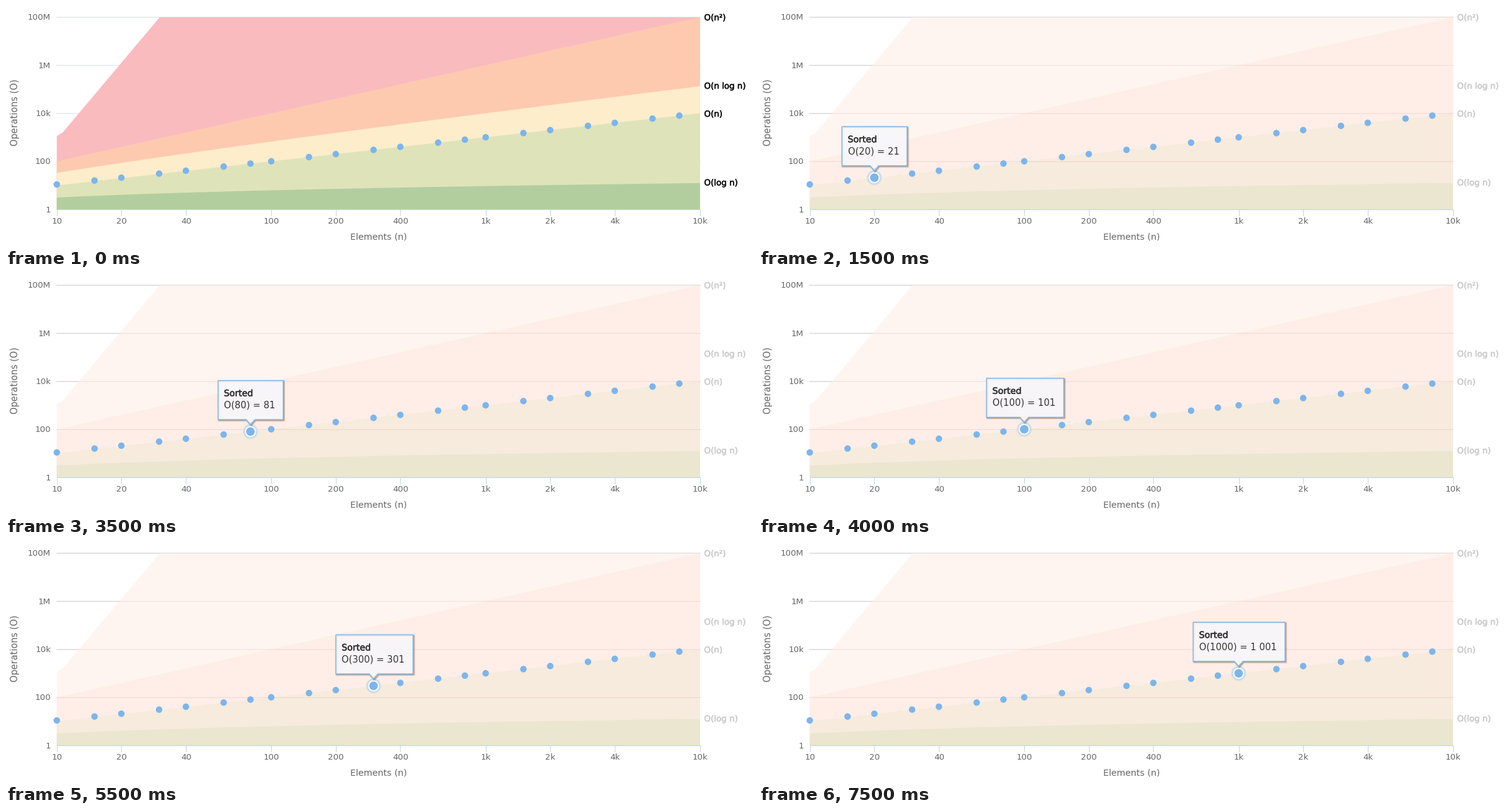
These frames come from a looping animation (1200 px wide and 386 px high, 8 s). A matplotlib script:

```python
import numpy as np
import matplotlib.pyplot as plt
from matplotlib.animation import FuncAnimation
from matplotlib.patches import Circle, Polygon
from matplotlib.patheffects import withStroke

W, H, DPI = 1200, 386, 100
PX = 72 / DPI
LEFT, RIGHT, BASE, DECADE = 81.6, 1115, 327.3, 38.7
BLUE, AXIS = "#7cb5ec", "#c3d3e6"

plt.rcParams["font.family"] = "DejaVu Sans"
fig = plt.figure(figsize=(W / DPI, H / DPI), dpi=DPI, facecolor="white")
ax = fig.add_axes([0, 0, 1, 1])
ax.set(xlim=(0, W), ylim=(H, 0))
ax.axis("off")


def x_of(n):
    return LEFT + (np.log10(n) - 1) * (RIGHT - LEFT) / 3


def y_of(ops):
    return BASE - DECADE * np.log10(ops)


def embolden(t, color):
    t.set_color(color)
    t.set_path_effects([withStroke(linewidth=0.6 * PX, foreground=color)])


def text(x, y, s, size, color="#666666", bold=False, va="baseline", **kw):
    t = ax.text(x, y, s, fontsize=size * PX, color=color, va=va, **kw)
    if bold:
        embolden(t, color)
    return t


# Complexity regions, each painted down to the axis over the one before
n = np.logspace(1, 4, 200)
curves = [
    ([LEFT, 91, 247, RIGHT], [209, 203.5, 18, 18]),
    (x_of(n), y_of(n ** 2)),
    (x_of(n), y_of(n * np.log2(n))),
    (x_of(n), y_of(n)),
    (x_of(n), y_of(np.log2(n)) + 1),
]
VIVID = ["#fabbbf", "#fdcab0", "#feedca", "#dfe3b9", "#b3ce9e"]
FADED = ["#fef5f1", "#feeee7", "#feeee7", "#f6ebdc", "#ebe6d0"]
regions = [ax.fill_between(x, y, BASE, lw=0, zorder=2) for x, y in curves]

# Axes: the grid lies behind the regions and shines through when they fade
shine = []
for power, label in zip((0, 2, 4, 6, 8), ("1", "100", "10k", "1M", "100M")):
    y = y_of(10.0 ** power)
    text(72, y + 4.5, label, 13.4, ha="right")
    if power:
        span = [LEFT, RIGHT], [y + 0.4] * 2
        ax.plot(*span, lw=1.2 * PX, color="#dbe2e7", zorder=1, snap=False)
        shine += ax.plot(*span, lw=1.2 * PX, color=(0.75, 0.55, 0.55, 0.2),
                         zorder=3, snap=False)

ax.plot([LEFT, RIGHT], [327, 327], color=AXIS, lw=1.2 * PX, zorder=3)
for value in (10, 20, 40, 100, 200, 400, 1000, 2000, 4000, 10000):
    x = x_of(value)
    ax.plot([x, x], [327, 337], color=AXIS, lw=PX, zorder=3)
    label = f"{value // 1000}k" if value >= 1000 else str(value)
    text(x + 0.4, 350.5, label, 13.4, ha="center")

text(598.5, 375.5, "Elements (n)", 14.3, ha="center")
text(22.5, 171.5, "Operations (O)", 14.5, ha="right", va="center", rotation=90)

names = [text(1121.5, y, s, 13.4, bold=True) for y, s in (
    (23, "O(n²)"), (133, "O(n log n)"), (178, "O(n)"), (288.5, "O(log n)"))]

# Measurements
sizes = [10, 15, 20, 30, 40, 60, 80, 100, 150, 200, 300, 400, 600, 800,
         1000, 1500, 2000, 3000, 4000, 6000, 8000]
for size in sizes:
    ax.add_patch(Circle((x_of(size), y_of(size + 1)), 5.2, fc=BLUE, lw=0,
                        zorder=5))

# Hovered point and its tooltip
halo = Circle((0, 0), 12, fc="#cfdee8", lw=0, zorder=4)
spot = Circle((0, 0), 7.8, fc=BLUE, ec="white", lw=1.8 * PX, zorder=6)
shadows = [Polygon([(0, 0)] * 3, fill=False, ec=(0, 0, 0, a), lw=w * PX,
                   joinstyle="round", zorder=7)
           for w, a in ((5, 0.06), (3, 0.12), (1.5, 0.18))]
box = Polygon([(0, 0)] * 3, fc=(0.97, 0.97, 0.98, 0.87), ec="#86b7e4",
              lw=1.5 * PX, joinstyle="round", zorder=8)
for patch in (halo, spot, *shadows, box):
    ax.add_patch(patch)
heading = text(0, 0, "Sorted", 14.2, "#333333", bold=True, zorder=9)
reading = text(0, 0, "", 14.7, "#333333", zorder=9)
hover = [halo, spot, *shadows, box, heading, reading]

# Reach of the box left and right of its point, by digits shown
EXTENT = {2: (52, 52.5), 3: (60.5, 63.5), 4: (73, 74.5)}


def draw(frame):
    active = frame > 0
    for region, color in zip(regions, FADED if active else VIVID):
        region.set_facecolor(color)
    for name in names:
        embolden(name, "#cccccc" if active else "#111111")
    for artist in shine + hover:
        artist.set_visible(active)
    if not active:
        return

    size = sizes[frame - 1]
    x, y = x_of(size), y_of(size + 1)
    halo.center = spot.center = x, y

    before, after = EXTENT[len(str(size))]
    x0, x1, top, bottom = x - before, x + after, y - 82, y - 19.3
    outline = np.array([(x0, top), (x1, top), (x1, bottom), (x + 7, bottom),
                        (x, y - 11.5), (x - 7, bottom), (x0, bottom)])
    box.set_xy(outline)
    for shadow in shadows:
        shadow.set_xy(outline + 1.2)
    heading.set_position((x0 + 9.3, top + 25))
    reading.set_position((x0 + 9.3, top + 44))
    total = f"{size + 1:,}".replace(",", " ")
    reading.set_text(f"O({size}) = {total}")


anim = FuncAnimation(fig, draw, frames=16, interval=500, repeat=True,
                     repeat_delay=0, init_func=lambda: draw(0), blit=False)
plt.show()
```
